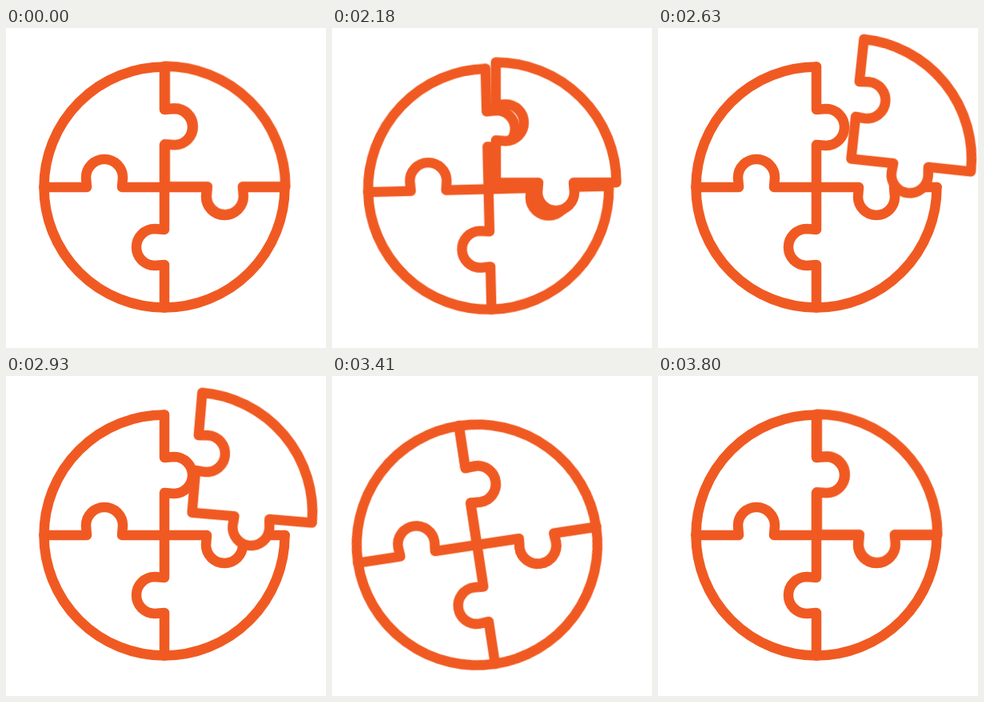
Animation, 400 px wide and 400 px high, one loop 3830 ms. Source, as an HTML page:

```html
<!DOCTYPE html>
<html lang="en">
<head>
<meta charset="utf-8">
<title>Puzzle circle</title>
<style>
html, body { margin: 0; width: 100%; height: 100%; overflow: hidden; background: #fff; }
svg { display: block; width: 100vw; height: 100vh; }
.line { fill: none; stroke: #f05a22; stroke-width: 12.5; stroke-linecap: round; stroke-linejoin: round; }
.piece { fill: #fff; animation: pop 3830ms linear infinite; }
.puzzle { animation: recoil 3830ms linear infinite; }

/* Wind-up before the piece leaves, knock-back when it returns */
@keyframes recoil {
  0%, 52.98% { transform: translate(0, 0) rotate(0deg); }
  53% { transform: translate(-3px, 3px) rotate(-2deg); animation-timing-function: cubic-bezier(.3, .4, .5, 1); }
  54.83% { transform: translate(-10px, 10px) rotate(-6deg); animation-timing-function: cubic-bezier(.4, 0, .4, 1); }
  58.49% { transform: translate(0, 0) rotate(0deg); }
  81.98% { transform: translate(0, 0) rotate(0deg); animation-timing-function: cubic-bezier(.4, 0, .5, 1); }
  88.25% { transform: translate(-17px, 12.3px) rotate(-8.8deg); animation-timing-function: cubic-bezier(.33, 0, .2, 1); }
  99.22%, 100% { transform: translate(0, 0) rotate(0deg); }
}

@keyframes pop {
  0%, 52.98% { transform: translate(.8px, -.8px) rotate(0deg); }
  53% { transform: translate(0, 0) rotate(0deg); }
  56.01% { transform: translate(0, 0) rotate(0deg); animation-timing-function: cubic-bezier(.215, .61, .355, 1); }
  67.89% { transform: translate(43.5px, -35.5px) rotate(6.1deg); animation-timing-function: cubic-bezier(.6, 0, .75, .45); }
  83.55%, 94.5% { transform: translate(0, 0) rotate(0deg); }
  99.22%, 100% { transform: translate(.8px, -.8px) rotate(0deg); }
}
</style>
</head>
<body>
<svg viewBox="0 0 400 400">
  <defs>
    <path id="arm" d="M-150.5 0H-97L-98 -12A23 23 0 0 1 -52 -12L-53 0H0"/>
  </defs>
  <g transform="translate(198 199)">
    <g class="puzzle">
      <g class="line">
        <path d="M0 -150.5A150.5 150.5 0 1 0 150.5 0"/>
        <use href="#arm"/>
        <use href="#arm" transform="rotate(90)"/>
        <use href="#arm" transform="rotate(180)"/>
        <use href="#arm" transform="rotate(270)"/>
      </g>
      <path class="line piece" d="M0 -150.5V-97L12 -98A23 23 0 0 1 12 -52L0 -53V0H53L52 12A23 23 0 0 0 98 12L97 0H150.5A150.5 150.5 0 0 0 0 -150.5Z"/>
    </g>
  </g>
</svg>
</body>
</html>
```
